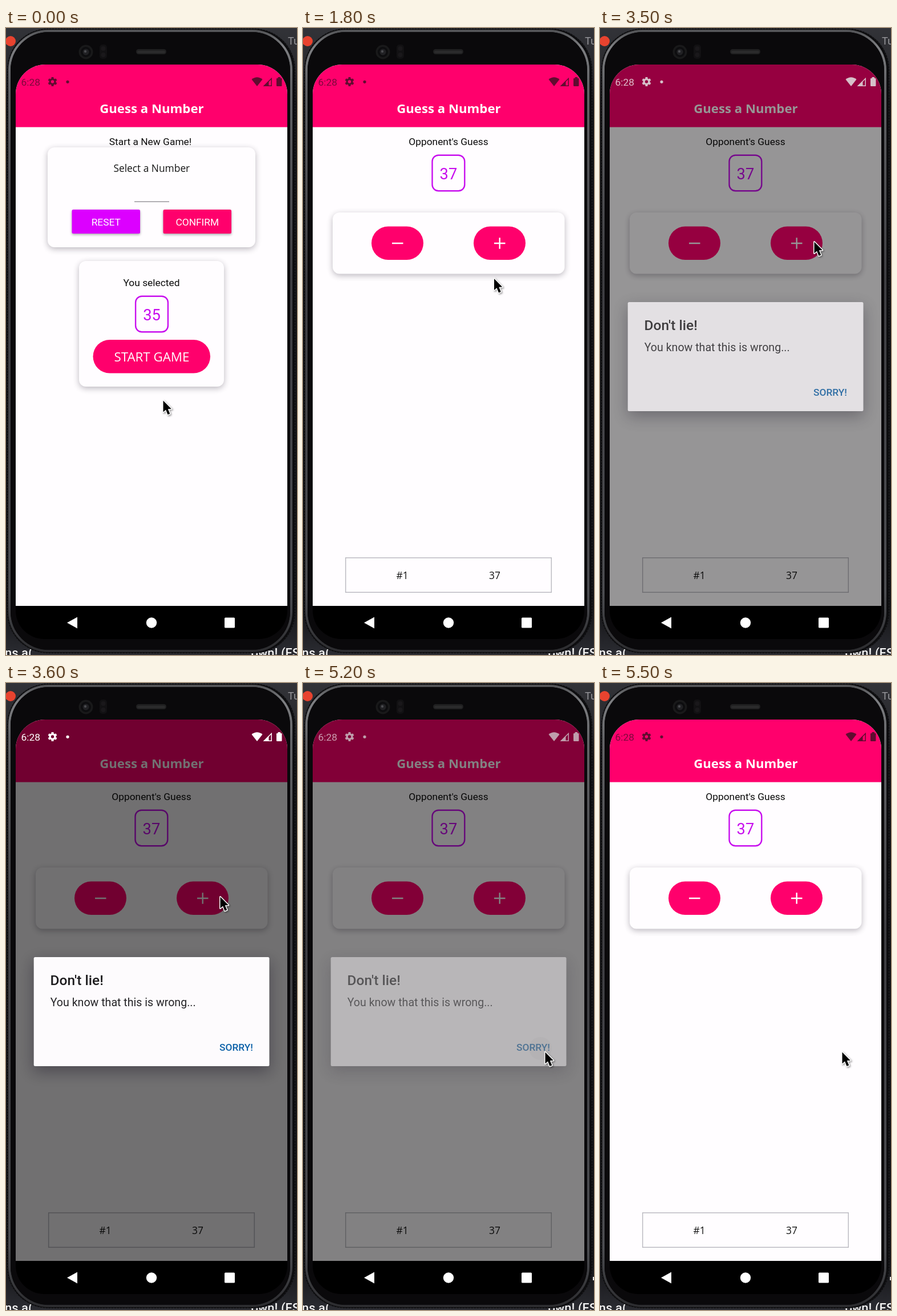
An HTML page with a canvas for the animation above (5600 ms loop, 510x1098 px).

```html
<!DOCTYPE html>
<html lang="en">
<head>
<meta charset="utf-8">
<title>Guess a Number</title>
<style>
  html, body { margin: 0; width: 100%; height: 100%; overflow: hidden; background: #131315; }
  canvas { display: block; width: 510px; height: 1098px; }
</style>
</head>
<body>
<canvas id="stage" width="510" height="1098"></canvas>
<script>
const stage = document.getElementById('stage').getContext('2d');
const layer = document.createElement('canvas');
layer.width = 510;
layer.height = 1098;
let ctx = stage;

const LOOP = 5600, STEP = 100;
const PINK = '#ff006c', PURPLE = '#c80eee', PAPER = '#fffdff';
const ROBOTO = 'Roboto, sans-serif', OPEN = '"Open Sans", sans-serif';

// Each key is [time, value, ...]; values ease smoothly between keys.
const cursorKeys = [
  [0, 275.5, 652.5], [200, 275.5, 652.5], [900, 290.5, 573.5], [1300, 290.5, 573.5],
  [1800, 335, 439], [2400, 375.5, 374.5], [3600, 375.5, 374.5],
  [4300, 400, 632], [4700, 400, 632], [5100, 424.5, 646.5]
];
const dimKeys = [[3300, 0], [3600, 0.555], [3700, 0.64], [5100, 0.64], [5200, 0.49], [5400, 0]];
const dialogKeys = [[3300, 0], [3600, 0.985], [3700, 1], [5100, 1], [5200, 0.43], [5300, 0]];
const lightKeys = [[3300, 0], [3600, 1], [5100, 1], [5200, 0.6], [5400, 0]];
const startKeys = [[1000, 1], [1100, 0.6]];
const plusKeys = [[2900, 1], [3000, 0.6], [3100, 0.6], [3300, 1]];
const rippleKeys = [[4900, 0], [5100, 0.08], [5300, 0]];

function at(keys, t) {
  if (t <= keys[0][0]) return keys[0].slice(1);
  for (let i = 1; i < keys.length; i++) {
    const a = keys[i - 1], b = keys[i];
    if (t <= b[0]) {
      const p = (t - a[0]) / (b[0] - a[0]), e = p * p * (3 - 2 * p);
      return a.slice(1).map((v, n) => v + (b[n + 1] - v) * e);
    }
  }
  return keys[keys.length - 1].slice(1);
}
const value = (keys, t) => at(keys, t)[0];

function box(x, y, w, h, r) {
  ctx.beginPath();
  ctx.roundRect(x, y, w, h, r);
}
function fillBox(x, y, w, h, r, color) {
  box(x, y, w, h, r);
  ctx.fillStyle = color;
  ctx.fill();
}
function strokeBox(x, y, w, h, r, color, width) {
  box(x, y, w, h, r);
  ctx.strokeStyle = color;
  ctx.lineWidth = width;
  ctx.stroke();
}
function disc(x, y, r, color) {
  ctx.beginPath();
  ctx.arc(x, y, r, 0, Math.PI * 2);
  ctx.fillStyle = color;
  ctx.fill();
}
function poly(points, color) {
  ctx.beginPath();
  points.forEach(([x, y]) => ctx.lineTo(x, y));
  ctx.closePath();
  ctx.fillStyle = color;
  ctx.fill();
}
function line(x1, y1, x2, y2, color, width) {
  ctx.beginPath();
  ctx.moveTo(x1, y1);
  ctx.lineTo(x2, y2);
  ctx.strokeStyle = color;
  ctx.lineWidth = width;
  ctx.stroke();
}
function text(str, x, y, size, color, family = ROBOTO, weight = 400, align = 'center') {
  ctx.font = `${weight} ${size}px ${family}`;
  ctx.textAlign = align;
  ctx.fillStyle = color;
  ctx.fillText(str, x, y);
}
function raised(x, y, w, h, r, color, blur, drop, alpha) {
  ctx.save();
  ctx.shadowColor = `rgba(40,35,50,${alpha})`;
  ctx.shadowBlur = blur;
  ctx.shadowOffsetY = drop;
  fillBox(x, y, w, h, r, color);
  ctx.restore();
}
const card = (x, y, w, h) => raised(x, y, w, h, 12, PAPER, 11, 3, 0.32);

// Draws a group on its own layer, so that it fades as one piece.
function faded(alpha, draw) {
  if (!alpha) return;
  if (alpha === 1) return draw();
  const below = ctx;
  ctx = layer.getContext('2d');
  ctx.clearRect(0, 0, 510, 1098);
  draw();
  ctx = below;
  ctx.globalAlpha = alpha;
  ctx.drawImage(layer, 0, 0);
  ctx.globalAlpha = 1;
}

function shade(stops) {
  const g = ctx.createLinearGradient(0, 0, 0, 1098);
  stops.forEach(([p, c]) => g.addColorStop(p, c));
  return g;
}

function backdrop(t) {
  ctx.fillStyle = shade([
    [0, '#323338'], [0.06, '#2a2a2e'], [0.12, '#131315'], [0.92, '#131315'], [1, '#2b2c32']
  ]);
  ctx.fillRect(0, 0, 510, 1098);
  disc(8, 23, 9, '#e8432f');
  text('Tu', 494, 29, 18, '#98989c', ROBOTO, 400, 'left');
  text('ns a(', -2, 1102, 22, '#f2f2f2', ROBOTO, 500, 'left');
  text('own! (FS', 515, 1102, 22, '#f2f2f2', ROBOTO, 500, 'right');
  if (t >= 3900) fillBox(508, 1040, 2, 6, 0, '#e8e8e8');
}

function phone() {
  fillBox(2, 1, 505, 1094, 72, '#0d0d0f');
  ctx.setLineDash([1, 4]);
  strokeBox(2.5, 1.5, 504, 1093, 72, 'rgba(150,150,155,.35)', 1);
  ctx.setLineDash([]);
  strokeBox(6, 5, 494, 1086, 69, shade([
    [0, '#4c4d50'], [0.03, '#7e7f82'], [0.09, '#626366'],
    [0.4, '#3d3d41'], [0.9, '#4c4d51'], [1, '#2a2a2d']
  ]), 4);
  fillBox(8, 7, 490, 1082, 67, '#0a090b');

  disc(140, 42, 12.5, '#19191a');
  disc(140, 42, 9, '#0d0d0f');
  disc(140, 42, 5.5, '#212124');
  disc(139, 41, 2.2, '#4a4b4f');
  fillBox(164, 29, 13, 25, 5, '#121113');
  disc(170.5, 36, 4, '#1a181b');
  disc(170.5, 47, 4, '#1a181b');
  fillBox(228, 37, 53, 9, 4.5, '#202021');
  fillBox(230, 40, 49, 4, 2, '#2b2b2c');

  fillBox(17, 1000, 476, 70, [0, 0, 50, 50], '#000');
  poly([[107, 1041.5], [125, 1031.5], [125, 1051.5]], '#fff');
  disc(255, 1041.5, 9.2, '#fff');
  fillBox(383, 1032.5, 18, 18, 1.5, '#fff');
}

function numberBox(n, x, y) {
  strokeBox(x + 1.2, y + 1.2, 56.8, 62.6, 11, PURPLE, 2.4);
  text(n, x + 29.6, y + 43, 27.3, PURPLE);
}

function setup(t) {
  text('Start a New Game!', 253, 205, 17.36, '#0c0c0c');
  card(73, 209, 364, 175);
  text('Select a Number', 255.3, 251.5, 17.36, '#161616', OPEN);
  fillBox(225, 303.5, 61, 1.3, 0, '#858387');
  raised(115.5, 318, 119.5, 42, 2.5, '#dc00ff', 4, 2, 0.4);
  raised(275.5, 318, 119.5, 42, 2.5, PINK, 4, 2, 0.4);
  text('RESET', 175.3, 346, 17.36, '#fff');
  text('CONFIRM', 335.3, 346, 17.36, '#fff');

  card(128, 408, 254, 220);
  text('You selected', 255, 451.5, 17.36, '#0c0c0c');
  numberBox('35', 225.9, 468.5);
  faded(value(startKeys, t), () => {
    fillBox(152.5, 546, 205.5, 58.5, 29.2, PINK);
    text('START GAME', 255.4, 583.5, 22.3, '#fff', OPEN);
  });
}

function game(t) {
  text("Opponent's Guess", 255, 205, 17.36, '#0c0c0c');
  numberBox('37', 225.3, 221.5);
  card(52, 323, 406.5, 107.5);
  fillBox(120, 347.5, 91, 58.5, 29.2, PINK);
  line(156, 377, 175.5, 377, '#fff', 2.4);
  faded(value(plusKeys, t), () => {
    fillBox(299, 347.5, 91, 58.5, 29.2, PINK);
    line(335, 377, 354.5, 377, '#fff', 2.4);
    line(344.7, 367.3, 344.7, 386.7, '#fff', 2.4);
  });
  strokeBox(74.7, 927.7, 360.6, 60.6, 0, '#bcbbc2', 1.5);
  text('#1', 174, 964.5, 17.36, '#141414', OPEN);
  text('37', 336, 964.5, 17.36, '#141414', OPEN);
}

function statusBar(t) {
  const k = value(lightKeys, t);
  const mix = (r, g, b) => `rgb(${[r, g, b].map(c => Math.round(c + (255 - c) * k)).join(',')})`;
  const dark = mix(96, 12, 48);
  text('6:28', 26.5, 101, 17.36, mix(126, 8, 60), ROBOTO, 400, 'left');

  ctx.save();
  ctx.translate(81.5, 94);
  ctx.beginPath();
  ctx.arc(0, 0, 4.4, 0, Math.PI * 2);
  ctx.strokeStyle = dark;
  ctx.lineWidth = 3.4;
  ctx.stroke();
  for (let i = 0; i < 6; i++) {
    fillBox(-2, -8, 4, 4, 0.6, dark);
    ctx.rotate(Math.PI / 3);
  }
  ctx.restore();
  disc(108, 94.3, 2.6, dark);

  ctx.beginPath();
  ctx.moveTo(440, 102);
  ctx.lineTo(430.5, 90);
  ctx.quadraticCurveTo(440, 82.5, 449.5, 90);
  ctx.closePath();
  ctx.fillStyle = dark;
  ctx.fill();
  ctx.beginPath();
  ctx.moveTo(452.5, 101.2);
  ctx.lineTo(465.2, 101.2);
  ctx.lineTo(465.2, 88.5);
  ctx.closePath();
  ctx.strokeStyle = dark;
  ctx.lineWidth = 1.5;
  ctx.stroke();
  poly([[451, 102], [460.5, 102], [460.5, 92.5]], dark);
  fillBox(474, 88, 9.5, 14, 1.2, dark);
  fillBox(476.5, 86, 4.5, 3, 0, dark);
}

function dialog(t) {
  raised(48.7, 480, 412.8, 191, 2.5, PAPER, 26, 9, 0.5);
  text("Don't lie!", 77.5, 528.5, 24.5, '#1d1c1e', ROBOTO, 500, 'left');
  text('You know that this is wrong...', 77.7, 566, 19.6, '#242326', ROBOTO, 400, 'left');
  disc(416, 640, 20, `rgba(0,0,0,${value(rippleKeys, t)})`);
  text('SORRY!', 403.5, 644, 17.36, '#0c62aa', ROBOTO, 500);
}

function screen(t) {
  ctx.save();
  box(17, 64, 476, 948, [52, 52, 0, 0]);
  ctx.clip();
  ctx.fillStyle = PAPER;
  ctx.fillRect(17, 64, 476, 948);
  ctx.fillStyle = PINK;
  ctx.fillRect(17, 64, 476, 109.6);
  text('Guess a Number', 255.4, 149, 22.2, '#fff', OPEN, 700);
  (t < 1200 ? setup : game)(t);
  ctx.fillStyle = `rgba(0,0,0,${value(dimKeys, t)})`;
  ctx.fillRect(17, 64, 476, 948);
  statusBar(t);
  faded(value(dialogKeys, t), () => dialog(t));
  ctx.restore();
}

function cursor(t) {
  const [x, y] = at(cursorKeys, t);
  ctx.save();
  ctx.translate(x, y);
  ctx.beginPath();
  [[0, 0], [0, 20], [4.6, 16], [8, 24.5], [11.8, 23], [8.3, 14.8], [14.3, 14.5]]
    .forEach(([px, py]) => ctx.lineTo(px, py));
  ctx.closePath();
  ctx.lineJoin = 'round';
  ctx.strokeStyle = '#fff';
  ctx.lineWidth = 3;
  ctx.shadowColor = 'rgba(0,0,0,.4)';
  ctx.shadowBlur = 3;
  ctx.shadowOffsetX = ctx.shadowOffsetY = 1.5;
  ctx.stroke();
  ctx.shadowColor = 'transparent';
  ctx.fillStyle = '#000';
  ctx.fill();
  ctx.restore();
}

function render(t) {
  backdrop(t);
  phone();
  screen(t);
  cursor(t);
}

const began = performance.now();
let shown = -1;
function tick() {
  const t = Math.floor(((performance.now() - began) % LOOP) / STEP) * STEP;
  if (t !== shown) render(shown = t);
  requestAnimationFrame(tick);
}
tick();
</script>
</body>
</html>
```
